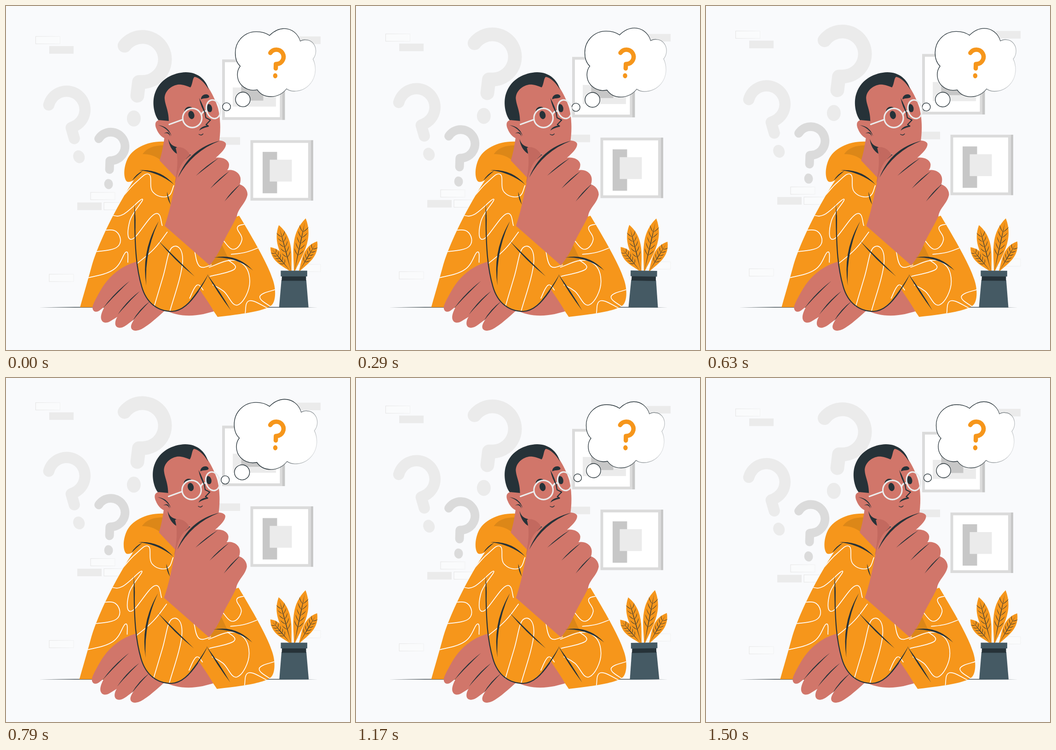
These frames come from a looping animation (748 by 748 pixels, 1540 ms). An HTML page:

```html
<!DOCTYPE html>
<html lang="en">
<head>
<meta charset="utf-8">
<title>Thinking man</title>
<style>
  html, body { margin: 0; width: 100%; height: 100%; overflow: hidden; background: #f9fafc; }
  svg { display: block; width: 100vw; height: 100vh; }
  .orange { fill: #f6961b; color: #f6961b; }
  .shade { fill: #dc8718; }
  .skin { fill: #d1766a; }
  .thumb { fill: #c3695f; }
  .dark { fill: #263238; }
  .slate { fill: #455a64; }
  .light { fill: #ebebeb; color: #ebebeb; }
  .mid { fill: #dbdbdb; color: #dbdbdb; }
  .grey { fill: #c7c7c7; }
  .white { fill: #fff; }
  .swirl { fill: none; stroke: #fff; stroke-width: 1.7; }
  .brick { fill: #fafbfc; stroke: url(#fade); }
  .glass { fill: none; stroke: #ebebeb; stroke-width: 3.2; stroke-linecap: round; }
  .line { fill: none; stroke: #263238; stroke-width: 2.2; stroke-linecap: round; stroke-linejoin: round; }
  .bubble { fill: #fff; stroke: url(#rim); stroke-width: 1.3; }
</style>
</head>
<body>
<svg viewBox="0 0 748 748">
  <defs>
    <linearGradient id="fade">
      <stop stop-color="#e4e4e4"/><stop offset="1" stop-color="#f1f2f3"/>
    </linearGradient>
    <linearGradient id="rim" gradientUnits="userSpaceOnUse" x1="500" y1="90" x2="672" y2="150">
      <stop offset=".55" stop-color="#263238"/><stop offset="1" stop-color="#263238" stop-opacity=".1"/>
    </linearGradient>
    <g id="mark">
      <path fill="none" stroke="currentColor" stroke-width=".61" stroke-linecap="round" stroke-linejoin="round" d="M-.8 -.61A1 1 0 1 1 0 1H-.16L-.235 1.61"/>
      <ellipse cx="-.39" cy="2.62" rx=".306" ry=".355"/>
    </g>
    <path id="body" d="M278 380C240 438 202 515 188 563C178 600 169 630 162 655H300L440 645L461 676C520 669 560 664 578 651C589 641 588 612 580 592C570 560 530 492 508 456L440 480L371 365L298 340Z"/>
    <path id="sleeve" d="M282 430C281 530 285 572 296 610C306 645 330 664 362 664C388 661 412 634 441 586L449 560L334 467L296 440Z"/>
    <clipPath id="cloth"><use href="#body"/><use href="#sleeve"/></clipPath>
  </defs>

  <g id="wall"></g>
  <path class="dark" d="M72 655.200L150 654.600H600L678 655.200L600 655.800H150Z"/>

  <g id="bubble" class="bubble">
    <path d="M573 66C585 54 596 51.500 604 51.500C620 51.500 633 62 638 78C643 75 648 75 651 75.500C663 76 671 87 671 99C671 106 669 111 665 116C669 124 670 131 670 139C669 165 650 184 625 184C618 184 613 182 609 179C600 190 589 195.500 576 195.500C563 195.500 553 190 547 181C541 182 540 182 538 182C519 181 505 167 505 149C505 142 507 136 511 131C503 124 500.500 114 500.500 103C500.500 78 520 58 545 58C556 58 566 61 573 66Z"/>
    <circle cx="516.500" cy="201.500" r="15.500"/>
    <circle cx="482" cy="217" r="8.500"/>
  </g>
  <g id="query"></g>

  <g id="plant">
    <g id="leaves"></g>
    <path class="slate" d="M599 596H653L658 655.500H594Z"/>
    <path class="dark" d="M600 587H652.500V597.500H599.500Z"/>
    <path class="slate" d="M597.500 575.500H655V588H597.500Z"/>
  </g>

  <g id="man">
    <use href="#body" class="orange"/>
    <path class="shade" d="M468 514L483 546L500 549C480 551 465 556 445 566Z"/>
    <path class="skin" d="M345 660C370 674 400 676 430 670L453 664C441 643 430 629 418 610L350 636Z"/>
    <path class="skin" d="M289 555C250 564 222 590 205 621C196 637 189 650 189 656C190 667 200 667 207 660L216 653C210 663 206 674 208 681C211 690 220 691 230 684L243 676C238 684 237 693 241 697C247 702 256 700 268 690L280 681C274 690 271 697 274 702C279 709 292 706 303 698C320 687 335 672 348 661L345 590Z"/>
    <use href="#sleeve" class="orange"/>
    <g id="swirls" class="swirl" clip-path="url(#cloth)"></g>
    <path class="line" d="M281 455C281 530 285 572 296 610C306 645 330 664 362 664C384 663 401 646 419 620"/>

    <path class="orange" d="M346 295C310 293 275 309 264 335C256 354 257 374 263 381C267 384 273 382 278 379L298 359C325 357 350 370 371 391V365L346 325Z"/>
    <path class="shade" d="M298 322C307 309 322 303 344 303L337 335C326 326 314 322 298 322Z"/>
    <path class="skin" d="M346 280C344 300 340 320 335 336L372 375L398 322Z"/>
    <path class="dark" d="M354 289C358 302 366 306 375 307C386 317 396 323 411 324L393 334L372 321C362 315 355 302 354 289Z"/>

    <path class="skin" d="M345 190C353 160 395 145 422 156C440 170 455 200 462 222C468 246 468 275 464 298L408 324C388 319 367 306 354 289L348 250Z"/>
    <path class="dark" d="M333 249C322 235 318 208 325 189C336 158 365 145 392 144C418 144 436 160 442 182C432 165 421 156 411 154C406 158 407 170 402 177C392 173 383 170 374 171C358 174 345 187 346 202C347 216 355 227 355 252Z"/>
    <path class="skin" d="M334 248C325 250 324 258 328 267C333 280 343 289 353 289C361 288 361 281 359 270L355 250Z"/>
    <g class="dark">
      <ellipse cx="404" cy="237" rx="6.500" ry="9" transform="rotate(-14 404 237)"/>
      <ellipse cx="443" cy="222" rx="6" ry="9" transform="rotate(-14 443 222)"/>
      <path d="M389 230C389 219 402 215 409 224C402 223 395 224 389 230ZM425 201C427 191 441 189 443 197C442 202 433 199 425 203Z"/>
      <path d="M441 260C431 260 424 264 421 271C427 266 435 264 441 262.500Z"/>
    </g>
    <path class="line" d="M433 229L435.500 243L445.500 248L436 258L441 261"/>
    <path class="line" style="stroke-width:1.5" d="M420.500 279C424 281.500 427 281 429.500 278"/>
    <g class="glass">
      <circle cx="406" cy="243.500" r="20.800"/>
      <ellipse cx="452" cy="224.500" rx="15" ry="20.500" transform="rotate(-14 452 224.500)"/>
      <path d="M385 247L356 257.500M426 236C428 230 433 227 438 229"/>
    </g>

    <path class="thumb" d="M370 309C376 303 395 309 401 324C386 337 378 350 373 378L368 385C374 355 376 330 370 309Z"/>
    <path class="skin" d="M346 478C356 450 363 415 368 390C372 370 378 348 388 337C405 320 425 307 447 296C462 290 476 292 479 299C481 307 470 319 457 330C470 328 484 333 486 344C486 350 485 353 482 357C495 354 511 362 511 377C511 382 510 386 509 388C518 390 527 400 526 411C522 430 505 440 503 457C495 475 482 495 472 517C465 535 455 550 444 564Z"/>
    <g id="folds" class="dark"></g>
  </g>
</svg>

<script>
const $ = id => document.getElementById(id);
const add = (id, markup) => $(id).insertAdjacentHTML('beforeend', markup);
const rect = (cls, x, y, w, h) => `<rect class="${cls}" x="${x}" y="${y}" width="${w}" height="${h}"/>`;
const mark = (cls, x, y, r, tilt) =>
  `<use href="#mark" class="${cls}" transform="translate(${x} ${y}) rotate(${tilt}) scale(${r})"/>`;

// Pointed stroke, w wide in the middle, bowed sideways by bend.
function lens(x0, y0, x1, y1, bend = 0, w = 2.2) {
  const len = Math.hypot(x1 - x0, y1 - y0);
  const nx = (y0 - y1) / len, ny = (x1 - x0) / len;
  const via = b => `Q${(x0 + x1) / 2 + nx * b} ${(y0 + y1) / 2 + ny * b} `;
  return `<path d="M${x0} ${y0}${via(bend + w)}${x1} ${y1}${via(bend - w)}${x0} ${y0}Z"/>`;
}

// Smooth line through a few points.
function swirl(...n) {
  const p = [];
  for (let i = 0; i < n.length; i += 2) p.push([n[i], n[i + 1]]);
  const knot = i => p[Math.max(0, Math.min(p.length - 1, i))];
  const handle = (i, s) => [0, 1].map(c => knot(i)[c] + s * (knot(i + 1)[c] - knot(i - 1)[c]) / 4.6);
  let d = 'M' + p[0];
  for (let i = 1; i < p.length; i++) d += `C${handle(i - 1, 1)} ${handle(i, -1)} ${p[i]}`;
  add('swirls', `<path d="${d}"/>`);
}

// Leaf growing from x, y with rising side veins.
function leaf(x, y, length, width, tilt) {
  const side = s => `C${s * width * .3} ${-length * .3} ${s * width * .95} ${-length * .65} `;
  let veins = lens(0, 0, 0, -length * .93, 0, 1.5);
  for (let h = .3; h < .8; h += .11)
    for (const s of [-1, 1])
      veins += lens(0, -length * h, s * width * .36, -length * (h + .12), s * 2, 1);
  add('leaves', `<g transform="translate(${x} ${y}) rotate(${tilt})">
    <path class="orange" d="M-1 0${side(-1)}0 ${-length}M1 0${side(1)}0 ${-length}L-1 0Z"/><g class="dark">${veins}</g></g>`);
}

// Wall
const picture = (x, y) =>
  rect('grey', x + 131, y, 5.5, 131.5) + rect('mid', x, y, 131, 131.5) + rect('white', x + 6, y + 6, 119.5, 119.5);
for (const [x, y] of [[94, 88], [155, 428], [631, 67], [456, 286]]) add('wall', rect('light', x, y, 53, 16.5));
for (const [x, y] of [[64.5, 67], [184, 406], [213, 428], [94, 584], [631, 562.5]]) add('wall', rect('brick', x, y, 53, 16));
add('wall', picture(470, 117) + rect('light', 493, 178, 94, 41.5) + rect('grey', 511.5, 150, 48, 56.5));
add('wall', picture(531.5, 292.5) + rect('grey', 558, 318, 31.5, 90) + rect('light', 573.5, 335, 48, 47.5));
add('wall', mark('light', 297, 117, 49, 0) + mark('light', 132, 226, 40, -23) + mark('mid', 228, 306, 31, -5));
add('query', mark('orange', 588, 110.5, 15.6, -5));

leaf(620, 577, 104, 27, -15);
leaf(627, 577, 118, 29, 12);
leaf(618, 576, 67, 21, -40);
leaf(638, 576, 75, 23, 31);

// Hoodie pattern
swirl(200, 490, 240, 490, 244, 523, 192, 535);
swirl(180, 591, 235, 573, 262, 535, 266, 558);
swirl(258, 411, 284, 383, 312, 366, 320, 404, 352, 414, 366, 390);
swirl(231, 455, 256, 453, 298, 420, 270, 468, 275, 507, 325, 452, 341, 478);
swirl(472, 508, 495, 529, 514, 508, 504, 482, 522, 474);
swirl(490, 540, 520, 536, 549, 526);
swirl(442, 568, 503, 554, 531, 598, 505, 650, 474, 620, 450, 606);
swirl(444, 588, 498, 572, 484, 552);
swirl(521, 668, 530, 641, 568, 656);
swirl(580, 656, 553, 632, 588, 616);
swirl(322, 657, 342, 590, 362, 525, 385, 555, 357, 665);
swirl(286, 560, 323, 528, 352, 491);
swirl(400, 636, 416, 607, 430, 618);
swirl(411, 533, 422, 566, 448, 563);

// Fingers, then hoodie, thumb, ear and nose
const fold = (...a) => add('folds', lens(...a));
for (let i = 0; i < 3; i++) {
  fold(270 + 22 * i, 598 + 22 * i, 212 + 32 * i, 657 + 14 * i, 4);
  fold(414 + 31 * i, 369 + 28 * i, 463 + 24 * i, 331 + 28 * i, -2);
}
fold(275, 380, 299, 358, -3);
fold(291, 357, 366, 388, -16, 4);
fold(280, 430, 281, 500, -2);
fold(333, 468, 306, 608, 22, 4);
fold(332, 510, 411, 588, 3, 3);
fold(398, 645, 441, 583, 5);
fold(438, 583, 490, 662, 0, 3.2);
fold(453, 547, 538, 575, -21, 4);
fold(351, 404, 359, 432, 2);
fold(375, 373, 466, 293, -27, 4.5);
fold(332, 259, 361, 283, -10);
fold(344, 277, 358, 284, -10);
fold(421, 200, 436, 237, 1, 3.4);

// Motion
const LOOP = 1540, STEPS = 37;
const smooth = p => p * p * (3 - 2 * p);
const float = u => 14.6 * (Math.abs(2 * u - 1) - 1);
const sway = u => Math.asin(Math.sin(2 * Math.PI * u)) * 2 / Math.PI;
const beat = (u, start, rise, fall) => Math.max(0, Math.min((u - start) / rise, (start + rise + fall - u) / fall));

// Alternating swing that doubles up to 4 and dies down again
function swing(i) {
  const reach = Math.min(4, Math.floor(2 ** (Math.min(i, 10 - i) - 1)));
  return i % 2 ? -reach : reach;
}
function shake(u) {
  const i = Math.floor(u * 10);
  return 1.5 * (swing(i) + (swing(i + 1) - swing(i)) * smooth(u * 10 - i)) - .7;
}

const move = (id, value) => $(id).setAttribute('transform', value);

function draw() {
  const k = Math.floor((performance.now() + 3) % LOOP / LOOP * STEPS);
  const u = (k + 1) % STEPS / STEPS;
  const scale = 1 + .1 * (beat(u, 0, .1, .2) + beat(u, .4, .1, .1));
  move('wall', `translate(0 ${float(u)})`);
  move('man', `translate(${shake(u)} 0)`);
  move('bubble', `translate(572 139) scale(${scale}) translate(-572 -139)`);
  move('query', `rotate(${sway(u)} 589 124)`);
  move('plant', `rotate(${sway(u)} 626 558)`);
  requestAnimationFrame(draw);
}
draw();
</script>
</body>
</html>
```
